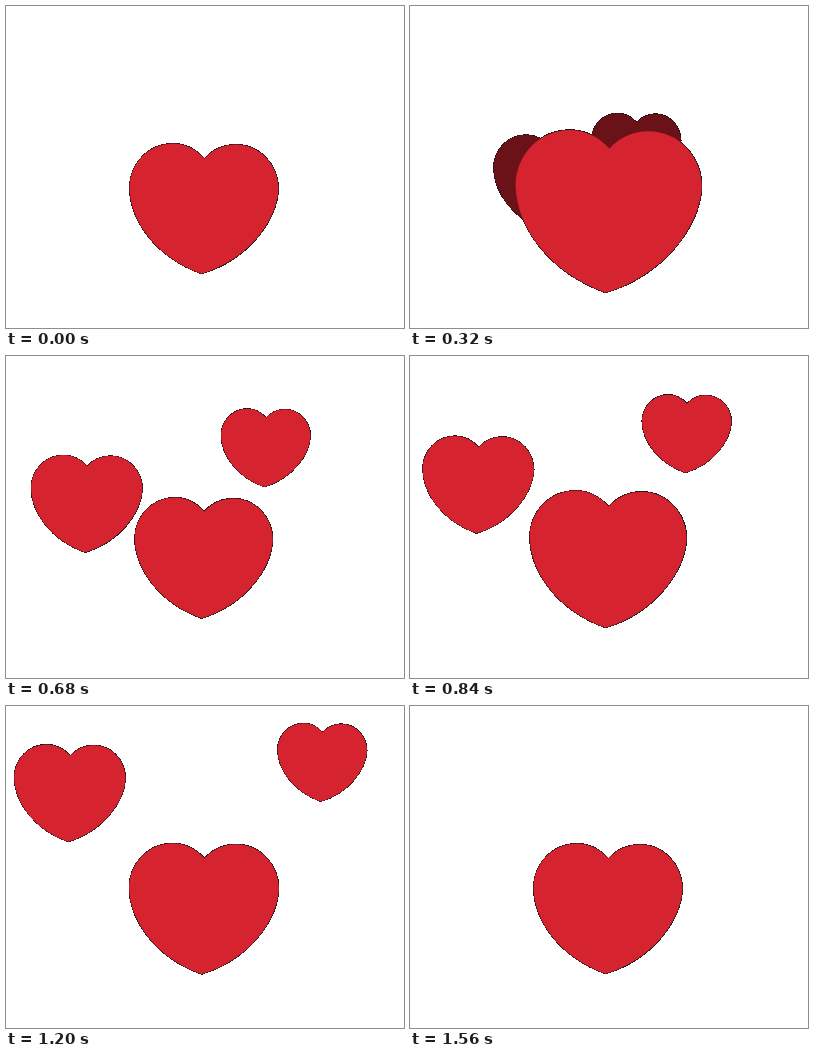
An HTML page that plays this animation: 398 by 322 pixels, repeating every 1640 ms.

```html
<!DOCTYPE html>
<html lang="en">
<head>
<meta charset="utf-8">
<title>Beating heart</title>
<style>
  html, body { margin: 0; width: 100%; height: 100%; overflow: hidden; background: #fff; }
  svg { display: block; width: 398px; height: 322px; }
  .edge { fill: #151515; stroke: #151515; stroke-width: 1.2; shape-rendering: crispEdges; }
  .edge path { vector-effect: non-scaling-stroke; }
</style>
</head>
<body>
<svg viewBox="0 0 398 322">
  <g class="edge"></g>
  <g class="body"></g>
</svg>
<script>
const STEP = 40, LOOP = 1640, END = 39, BEAT = 8;
const RED = [213, 36, 47];
const SHAPE = 'M3.5-39.5C-5-49-16-54.5-28-54.5C-53-54.5-71.5-34-71.5-10' +
  'C-71 22-46 59 .5 75.8C47 62 76 23 77.5-9C77.5-33 59-53.5 35-53.5C22-53.5 11-48 3.5-39.5Z';

// One key per beat
const PULSE = [1, 1.25, .895, 1.148, .958, 1.006];
const LEFT = { x: [195, 137, 83, 61, 63, 69], y: [192, 169.5, 144, 106, 70, 31.5] };
const RIGHT = { x: [195, 224.5, 254, 288, 323.5, 360.5], y: [192, 140, 90, 63, 46.5, 35] };

function linear(keys, beat) {
  const i = Math.floor(beat);
  return keys[i] + (keys[i + 1] - keys[i]) * (beat - i);
}

// Catmull-Rom curve through evenly timed keys
function curve(keys, beat) {
  const i = Math.floor(beat), p = beat - i, q = 1 - p;
  const b = keys[i], c = keys[i + 1];
  const a = keys[i - 1] ?? 2 * b - c, d = keys[i + 2] ?? 2 * c - b;
  return b * (1 + 2 * p) * q * q + c * (3 - 2 * p) * p * p +
    ((c - a) * q - (d - b) * p) * p * q / 2;
}

function makeHeart() {
  const parts = ['.edge', '.body'].map(layer => {
    const path = document.createElementNS('http://www.w3.org/2000/svg', 'path');
    path.setAttribute('d', SHAPE);
    return document.querySelector(layer).appendChild(path);
  });
  return (x, y, size, light, shown) => {
    for (const part of parts) {
      part.setAttribute('transform', `translate(${x} ${y}) scale(${size})`);
      part.setAttribute('visibility', shown ? 'visible' : 'hidden');
    }
    parts[1].setAttribute('fill', `rgb(${RED.map(c => Math.round(c * light))})`);
  };
}

const left = makeHeart(), right = makeHeart(), big = makeHeart();

function draw(time) {
  const n = Math.min(END, Math.floor((time % LOOP) / STEP));
  const beat = n / BEAT;
  const flying = n > 0 && n < END;
  const light = Math.max(0, Math.min(1, (n - 4) / 8, (END - n) / 7));
  left(curve(LEFT.x, beat), curve(LEFT.y, beat), .747, light, flying);
  right(curve(RIGHT.x, beat), curve(RIGHT.y, beat), .6, light, flying);
  big(195, 192, linear(PULSE, beat), 1, true);
}

const start = performance.now();
function tick() {
  draw(performance.now() - start);
  requestAnimationFrame(tick);
}
tick();
</script>
</body>
</html>
```
